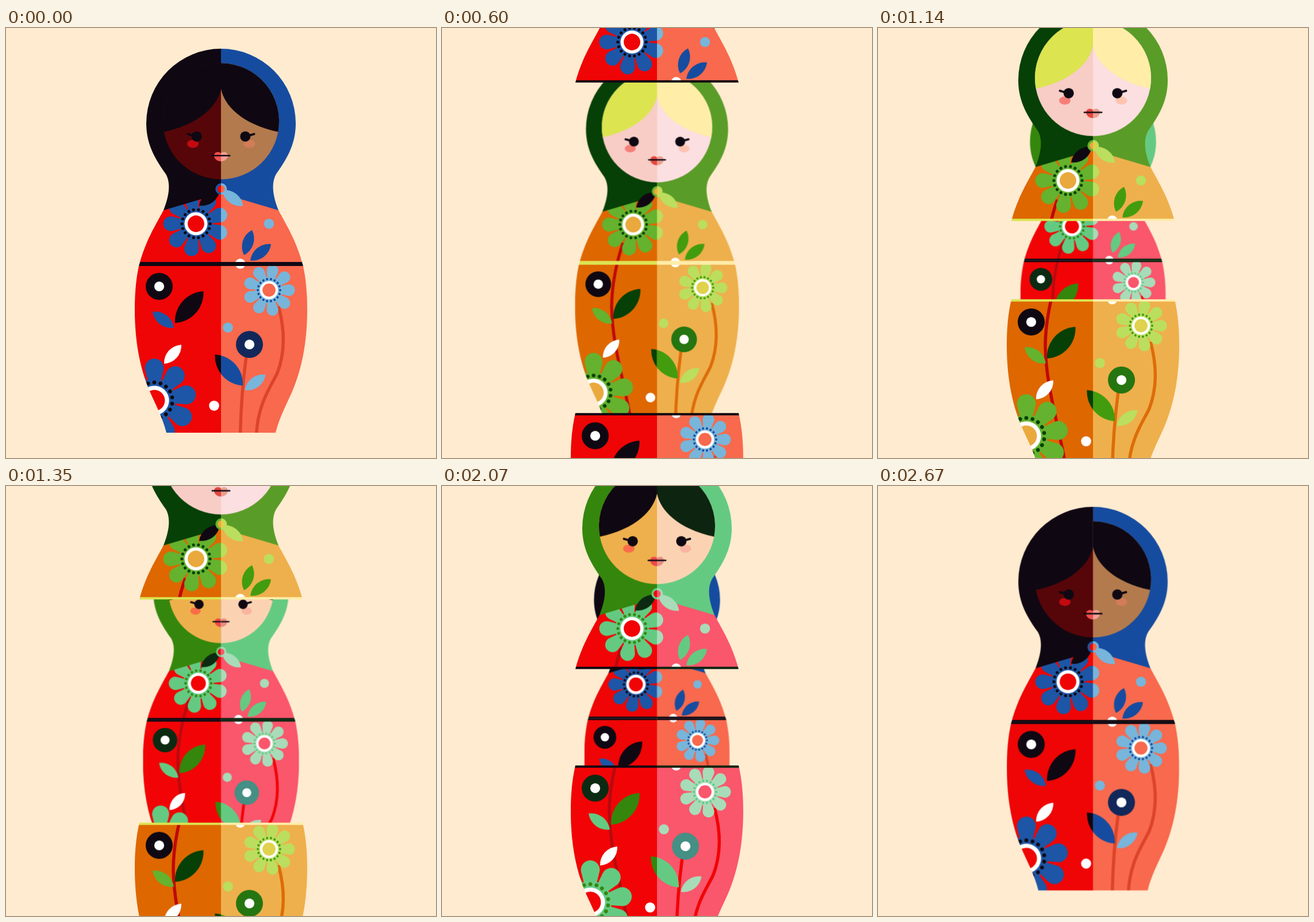
Recreate the animation shown at these times as an HTML page. Size 748 by 748 pixels, loop 2.7 s.

```html
<!DOCTYPE html>
<html lang="en">
<head>
<meta charset="utf-8">
<title>Nesting dolls</title>
<style>
html, body { margin: 0; width: 100%; height: 100%; overflow: hidden; background: #ffebd0; }
svg { position: absolute; left: 0; top: 0; width: 748px; height: 748px; }
svg.defs { width: 0; height: 0; }

.doll { animation: layer 2700ms step-end var(--delay) infinite; }
.grow { transform-origin: 374px 370px; animation: grow 2700ms var(--delay) infinite; }
.top { animation: lift 2700ms var(--delay) infinite; }
.base { animation: drop 2700ms var(--delay) infinite; }
.grow, .top, .base { animation-timing-function: cubic-bezier(.33333, 0, .66667, 1); }

/* a doll grows inside the previous one, then opens in front of the next */
@keyframes layer { 0% { z-index: 1; } 33.3333% { z-index: 2; } 66.6667%, 100% { z-index: 1; } }
@keyframes grow { 0% { transform: scale(var(--small)); } 33.3333%, 100% { transform: scale(1); } }
@keyframes lift { 0%, 33.3333% { transform: translateY(0); } 66.6667%, 100% { transform: translateY(-426px); } }
@keyframes drop { 0%, 33.3333% { transform: translateY(0); } 66.6667%, 100% { transform: translateY(350px); } }

.blue { --delay: -900ms; --small: .8; }
.blue .l { --body: #ef0505; --stem: #ef0505; --petal: #1d56a6; --leaf: #0f0812; --ring: #0f0812; --bow: #0f0812; --core: #ef0505;
  --scarf: #0f0812; --hair: #0f0812; --face: #560609; --cheek: #c20a10; --lips: #f0504c; }
.blue .r { --body: #f8694d; --stem: #dc4429; --petal: #78b5da; --leaf: #164ca0; --ring: #12285a; --bow: #78b5da; --core: #f8694d;
  --scarf: #164ca0; --hair: #0f0812; --face: #b37a4d; --cheek: #d27c58; --lips: #f39f95; }

.gold { --delay: 0ms; --small: .81; }
.gold .l { --body: #de6700; --stem: #c00808; --petal: #65b22e; --leaf: #064006; --ring: #0f0812; --bow: #0f0812; --core: #e9a93c;
  --scarf: #064006; --hair: #dce450; --face: #f8cdc6; --cheek: #f57f77; --lips: #e5463e; }
.gold .r { --body: #eeb04c; --stem: #dd6c08; --petal: #bbde5e; --leaf: #429c0e; --ring: #257510; --bow: #bbde5e; --core: #e0d24c;
  --scarf: #5a9c28; --hair: #ffeda8; --face: #fcdfe0; --cheek: #ffc4b0; --lips: #e9a090; }

.pink { --delay: -1800ms; --small: .81; }
.pink .l { --body: #f20406; --stem: #b80a10; --petal: #64ca82; --leaf: #34870c; --ring: #0c2a12; --bow: #0c2a12; --core: #f20406;
  --scarf: #34870c; --hair: #0f0812; --face: #eeb04c; --cheek: #fb6d48; --lips: #f04848; }
.pink .r { --body: #fa566c; --stem: #f20406; --petal: #a8dcb8; --leaf: #64ca82; --ring: #458f84; --bow: #a8dcb8; --core: #fa566c;
  --scarf: #64ca82; --hair: #0c2410; --face: #fcd3b2; --cheek: #f9b5a0; --lips: #ea8c80; }

.body { fill: var(--body); }
.petal { fill: var(--petal); }
.leaf { fill: var(--leaf); }
.ring { fill: var(--ring); }
.bow { fill: var(--bow); }
.core { fill: var(--core); }
.scarf { fill: var(--scarf); }
.hair { fill: var(--hair); }
.face { fill: var(--face); }
.cheek { fill: var(--cheek); }
.lips { fill: var(--lips); }
.white { fill: #fff; }
.ink { fill: #0f0812; }
.stem { fill: none; stroke: var(--stem); stroke-width: 5.5; }
.line { fill: none; stroke: #0f0812; stroke-linecap: round; }
</style>
</head>
<body>
<svg class="defs">
  <clipPath id="upper"><path d="M374 36A130 130 0 0 1 504 166C504 205 486 231 470 254C461 270 464 292 474 317C489 345 505 370 516 411H232C243 370 259 345 274 317C284 292 287 270 278 254C262 231 244 205 244 166A130 130 0 0 1 374 36Z"/></clipPath>
  <clipPath id="lower"><path d="M516 410C522 436 524 462 524 490C524 545 515 592 498 632C488 655 476 676 469 704H279C272 676 260 655 250 632C233 592 224 545 224 490C224 462 226 436 232 410Z"/></clipPath>
  <clipPath id="l"><path d="M200 0H375V748H200Z"/></clipPath>
  <clipPath id="r"><path d="M374 0H548V748H374Z"/></clipPath>
</svg>
<script>
const path = (cls, d) => `<path class="${cls}" d="${d}"/>`;
const dot = (cls, x, y, r) => `<circle class="${cls}" cx="${x}" cy="${y}" r="${r}"/>`;
const band = (cls, y, h) => `<rect class="${cls}" x="200" y="${y}" width="348" height="${h}"/>`;
const around = (n, draw) => Array.from({ length: n }, (_, i) => draw(i * 360 / n)).join('');

// two quarter arcs between the tips
function leaf(cls, x1, y1, x2, y2) {
  const r = Math.hypot(x2 - x1, y2 - y1) * Math.SQRT1_2;
  return path(cls, `M${x1} ${y1}A${r} ${r} 0 0 1 ${x2} ${y2}A${r} ${r} 0 0 1 ${x1} ${y1}Z`);
}

function flower(x, y, scale, turn) {
  const petals = around(9, a => `<path class="petal" transform="rotate(${a})" d="M8 -4L41 -12.4A12.8 12.8 0 1 1 41 12.4L8 4Z"/>`);
  const dots = around(18, a => `<circle class="leaf" transform="rotate(${a})" cx="24.6" r="2.6"/>`);
  return `<g transform="translate(${x} ${y}) scale(${scale}) rotate(${turn})">${petals}` +
    dot('petal', 0, 0, 29) + dots + dot('white', 0, 0, 20) + dot('core', 0, 0, 14.4) + '</g>';
}

const ring = (x, y) => dot('ring', x, y, 23.5) + dot('white', x, y, 8.6);

const stem = path('stem', 'M312 374C301 405 291 450 291 492C292 560 314 628 328 708');

const face = dot('face', 374, 162.3, 101) +
  path('hair', 'M274.7 180.7A101 101 0 1 1 473.3 180.7C410 167 380 135 374 106C368 135 338 167 274.7 180.7Z') +
  '<ellipse class="cheek" cx="325" cy="201.5" rx="10" ry="7"/><ellipse class="cheek" cx="423.5" cy="201.5" rx="10" ry="7"/>' +
  dot('ink', 331.7, 188.7, 9) + dot('ink', 416.3, 188.7, 9) +
  '<path class="line" stroke-width="3.8" d="M316.5 184.5L327 187.5M431.5 184.5L421 187.5"/>' +
  path('lips', 'M362 222C362 215 371 214 374 218C377 214 386 215 386 222C386 228 380 232 374 232C368 232 362 228 362 222Z') +
  '<path class="line" stroke-width="2.6" d="M358.8 222H389.2"/>';

const upper = band('body', 0, 420) + stem +
  flower(330.5, 340.5, 1, 20) +
  dot('petal', 457.5, 340.5, 8.8) +
  leaf('leaf', 414, 395, 428, 351.5) + leaf('leaf', 425, 404.5, 461, 376) +
  dot('white', 407.5, 410, 8.8) +
  band('hair', 407, 5) +
  path('scarf', 'M198 0H550V339.5L374 287.5L198 339.5Z') + face +
  leaf('bow', 372, 282, 336, 309) + leaf('bow', 376, 282, 412.5, 309.5) +
  dot('petal', 374.3, 280, 10) + dot('core', 374.3, 280, 6.3);

const lower = band('body', 400, 310) + stem +
  path('stem', 'M474 484C486 528 485 566 472 600C462 622 438 652 435.5 708') +
  path('stem', 'M418 570C412 615 408.5 660 407.5 708') +
  flower(457.5, 456, .79, 0) + flower(258, 648, 1.28, 30) +
  ring(266.5, 449.5) + ring(423.5, 550.5) +
  leaf('leaf', 294, 513, 343.5, 458) + leaf('petal', 255, 493.5, 292, 521.5) +
  leaf('white', 275, 584, 305, 551) +
  leaf('leaf', 363.5, 568, 412, 622) + leaf('petal', 415.5, 630, 451.5, 603) +
  dot('petal', 386, 521, 8.8) + dot('white', 362, 657, 8.8) + dot('white', 407.5, 410, 8.8) +
  band('hair', 409, 5);

const sides = art => ['l', 'r'].map(s => `<g class="${s}" clip-path="url(#${s})">${art}</g>`).join('');

document.body.insertAdjacentHTML('beforeend', ['blue', 'gold', 'pink'].map(name =>
  `<svg class="doll ${name}" viewBox="0 0 748 748"><g class="grow">
    <g class="base" clip-path="url(#lower)">${sides(lower)}</g>
    <g class="top" clip-path="url(#upper)">${sides(upper)}</g>
  </g></svg>`).join(''));
</script>
</body>
</html>
```
